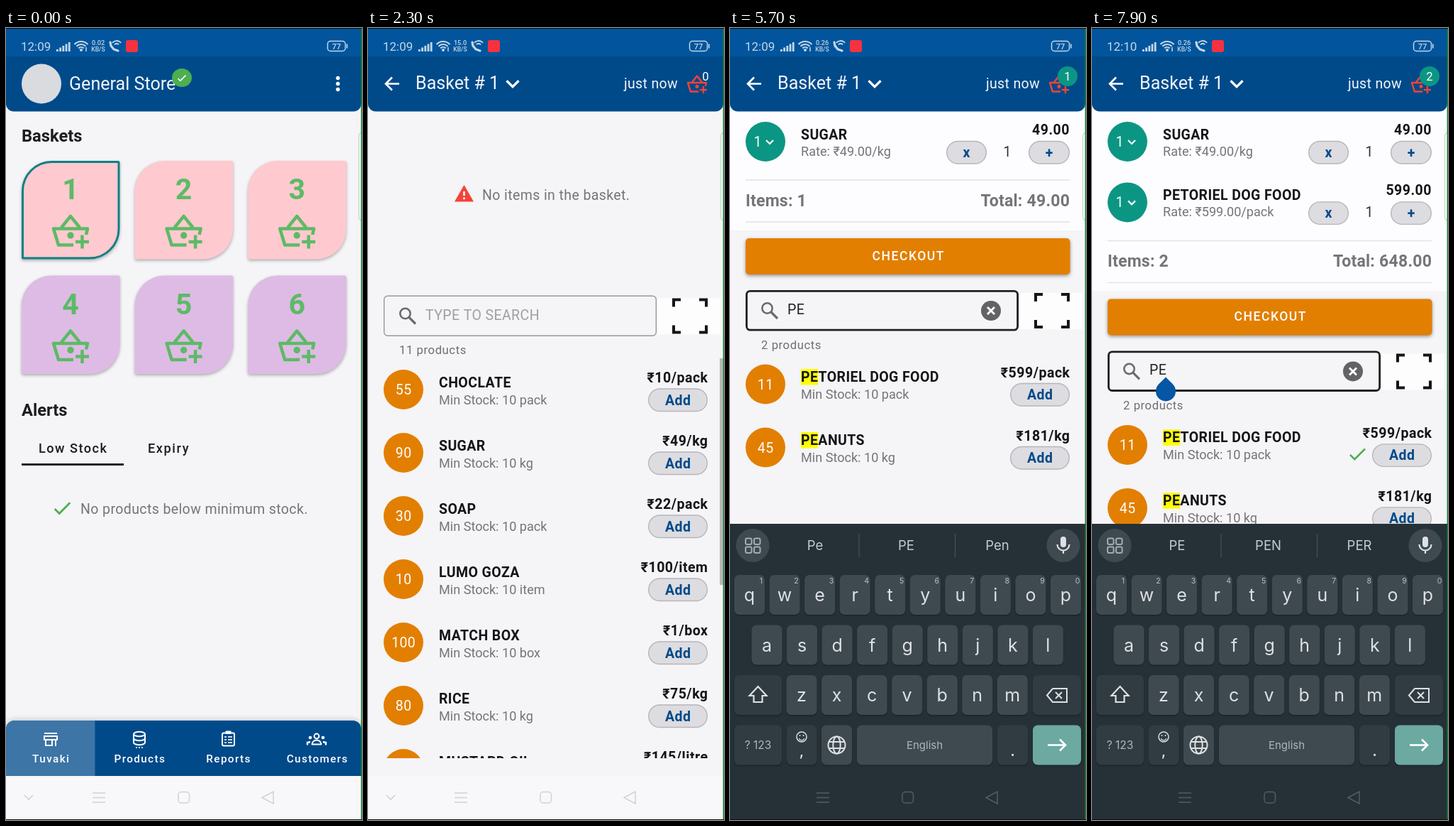
An HTML page with a canvas that plays this animation: 502 by 1115 pixels, repeating every 8 s.

```html
<!DOCTYPE html>
<html lang="en">
<head>
<meta charset="utf-8">
<title>Store basket</title>
<style>
html, body { margin: 0; width: 100%; height: 100%; overflow: hidden; background: #f5f4f7; }
canvas { display: block; width: 502px; height: 1115px; }
</style>
</head>
<body>
<canvas id="stage" width="502" height="1115"></canvas>
<script>
const W = 502, H = 1115, LOOP = 8000;
const screen2d = document.getElementById('stage').getContext('2d');
const layer = document.createElement('canvas');
layer.width = W; layer.height = H;
const layer2d = layer.getContext('2d');
let g = screen2d;

const BG = '#f5f4f7', BLUE = '#004a8a', ORANGE = '#e27f00', GREEN = '#4caf50', RED = '#f44336',
  TEAL = '#0b9683', GREY = '#757478', INK = '#151517', KB = '#263137', KEY = '#3f4a50', DARK = '#313c42';

const PRODUCTS = [
  ['CHOCLATE', 55, 10, 'pack'], ['SUGAR', 90, 49, 'kg'], ['SOAP', 30, 22, 'pack'],
  ['LUMO GOZA', 10, 100, 'item'], ['MATCH BOX', 100, 1, 'box'], ['RICE', 80, 75, 'kg'],
  ['MUSTARD OIL', 60, 145, 'litre'], ['PETORIEL DOG FOOD', 11, 599, 'pack'], ['PEANUTS', 45, 181, 'kg']
].map(([name, stock, rate, unit]) => ({ name, stock, rate, unit }));

const clamp = v => Math.max(0, Math.min(1, v));
const easeOut = u => 1 - (1 - u) ** 3;

// ---- drawing helpers
function text(s, x, y, size, color, { w = 400, ls = 0, al = 'left', f = 'Roboto' } = {}) {
  g.font = `${w} ${size}px ${f}, sans-serif`;
  g.letterSpacing = ls + 'px';
  g.textAlign = al;
  g.fillStyle = color;
  g.fillText(s, x + (al === 'right' ? ls : al === 'center' ? ls / 2 : 0), y);
}
function box(x, y, w, h, r, fill, stroke, lw = 1.4) {
  g.beginPath();
  g.roundRect(x, y, w, h, r);
  if (fill) { g.fillStyle = fill; g.fill(); }
  if (stroke) { g.strokeStyle = stroke; g.lineWidth = lw; g.stroke(); }
}
function disc(x, y, r, fill, stroke, lw = 2) {
  g.beginPath();
  g.arc(x, y, r, 0, 7);
  if (fill) { g.fillStyle = fill; g.fill(); }
  if (stroke) { g.strokeStyle = stroke; g.lineWidth = lw; g.stroke(); }
}
function arc(x, y, r, a, b, color, lw) {
  g.beginPath();
  g.arc(x, y, r, a * Math.PI, b * Math.PI);
  g.strokeStyle = color; g.lineWidth = lw; g.stroke();
}
function line(color, lw, ...p) {
  g.beginPath();
  for (let i = 0; i < p.length; i += 2) g.lineTo(p[i], p[i + 1]);
  g.strokeStyle = color; g.lineWidth = lw; g.stroke();
}
function shape(color, ...p) {
  g.beginPath();
  for (let i = 0; i < p.length; i += 2) g.lineTo(p[i], p[i + 1]);
  g.closePath(); g.fillStyle = color; g.fill();
}
function shadow(blur, dy, alpha) {
  g.shadowColor = `rgba(0,0,0,${alpha})`; g.shadowBlur = blur; g.shadowOffsetY = dy;
}
function clipped(x, y, w, h, r, draw) {
  g.save();
  g.beginPath(); g.roundRect(x, y, w, h, r); g.clip();
  draw();
  g.restore();
}
// A press ripple: grows while drifting to the middle, then fades.
function ripple(age, x0, y0, x1, y1, radius, rgb, hold = 250) {
  if (age < 0) return;
  const e = easeOut(clamp(age / 250));
  const a = 0.28 * clamp(age / 80) * (1 - clamp((age - hold) / 300));
  disc(x0 + (x1 - x0) * e, y0 + (y1 - y0) * e, radius * (0.3 + 0.7 * e), `rgba(${rgb},${a})`);
}
const check = (x, y, k, color, lw) => line(color, lw, x - 10 * k, y, x - 4 * k, y + 6 * k, x + 10 * k, y - 8 * k);
const chevron = (x, y, k, color, lw) => line(color, lw, x - k, y - k / 2, x, y + k / 2, x + k, y - k / 2);

function basket(x, y, k, c) {
  g.save();
  g.translate(x, y); g.scale(k, k);
  g.lineJoin = 'round';
  line(c, 4.5, -13, -6, 0, -22, 13, -6);
  line(c, 4.5, 4, 18.5, -17, 18.5, -24, -4.5, 24, -4.5, 22, 4);
  disc(0, 5, 4.7, c);
  line(c, 4.5, 7, 14, 26, 14);
  line(c, 4.5, 16.5, 4.5, 16.5, 23.5);
  g.restore();
}

// ---- system parts
function statusBar(t) {
  const c = '#c3d6e8';
  g.fillStyle = '#02559c'; g.fillRect(0, 0, W, 40);
  text(t < 6000 ? '12:09' : '12:10', 21, 32, 17, c);
  for (let i = 0; i < 5; i++) { g.fillStyle = c; g.fillRect(71 + i * 4.2, 30 - i * 2.5, 2.8, 3 + i * 2.5); }
  for (const r of [5, 9, 13]) arc(106, 32, r, -0.76, -0.24, c, 2.2);
  disc(106, 31, 2, c);
  line(c, 1.5, 113, 27, 113, 33);
  const speed = t < 400 ? '0.02' : t < 3200 ? '15.0' : t < 5600 ? '14.0' : '0.26';
  text(speed, 130, 24, 9.2, c, { w: 500, al: 'center' });
  text('KB/S', 130, 33, 8.6, c, { w: 500, al: 'center' });
  g.lineCap = 'round';
  line(c, 3.2, 147, 20, 148, 25, 152, 30, 158, 32);
  g.lineCap = 'butt';
  for (const r of [4, 8]) arc(156, 26, r, -0.78, -0.22, c, 1.8);
  box(169, 17, 17, 17, 3, '#f5323f');
  box(453.5, 18.5, 25, 14, 4, null, c, 1.5);
  g.fillStyle = c; g.fillRect(480, 22.5, 1.6, 6);
  text('77', 466, 29.5, 11, c, { w: 500, al: 'center' });
}
function navIcons(color, arrow) {
  if (arrow) chevron(32, 1083, 6, color, 1.6);
  for (const y of [1077, 1083.5, 1090]) line(color, 1.5, 122, y, 140, y);
  box(243, 1075.5, 15.5, 15.5, 4, null, color, 1.5);
  g.beginPath(); g.moveTo(361, 1083.5); g.lineTo(377, 1075); g.lineTo(377, 1092); g.closePath();
  g.lineWidth = 1.5; g.stroke();
}
function header() {
  box(0, 39, 501, 78.5, [0, 0, 11, 11], BLUE);
}

// ---- home page
function home(t) {
  header();
  disc(50, 78.5, 28, '#d9dbdf');
  text('General Store', 89, 87, 25.1, '#f2f6fa');
  g.beginPath(); g.ellipse(248, 70, 14, 13, 0, 0, 7); g.fillStyle = GREEN; g.fill();
  check(248, 71, 0.55, '#fff', 1.6);
  for (const y of [70.5, 78.5, 86.5]) disc(468, y, 2.7, '#fff');

  text('Baskets', 22, 159.5, 23.7, '#1d1c20', { w: 700 });
  for (let i = 0; i < 6; i++) {
    const x = 22 + (i % 3) * 159.6, y = 187 + (i > 2) * 161.5;
    const pressed = i === 0 && t >= 600, ink = pressed ? '#f0505a' : '#5dba66';
    g.save(); shadow(4, 2, 0.3);
    box(x, y, 138.5, 138.5, [42, 2, 42, 2], i < 3 ? '#ffc9d0' : '#debbe5');
    g.restore();
    text(i + 1, x + 69, y + 54, 41, ink, { w: 700, al: 'center' });
    basket(x + 69, y + 100, 1, ink);
    if (i) continue;
    clipped(x, y, 138.5, 138.5, [42, 2, 42, 2], () =>
      ripple(t - 600, x + 50, y + 60, x + 69, y + 69, 99, '0,0,0', 350));
    box(x + 1.5, y + 1.5, 135.5, 135.5, [41, 1, 41, 1], null, '#0a8182', 3);
  }

  text('Alerts', 22, 545.5, 23.7, '#1d1c20', { w: 700 });
  text('Low Stock', 46, 598, 18.1, '#1d1c20', { w: 500, ls: 1.5 });
  text('Expiry', 200, 598, 18.1, '#1d1c20', { w: 500, ls: 1.6 });
  g.fillStyle = '#212124'; g.fillRect(22, 613, 144, 3);
  check(79.5, 677, 1.08, GREEN, 2.8);
  text('No products below minimum stock.', 105, 684, 19.5, GREY, { ls: 0.4 });
  tabs();
}
function tabs() {
  g.save(); shadow(8, -1, 0.2);
  box(0, 975, 501, 78, [12, 12, 0, 0], BLUE);
  g.restore();
  box(0, 975, 125.5, 78, [12, 0, 0, 0], '#3c75a6');
  ['Tuvaki', 'Products', 'Reports', 'Customers'].forEach((s, i) =>
    text(s, 63 + i * 125.2, 1034, 15.3, '#fff', { w: 500, ls: 1.37, al: 'center' }));
  const c = '#fff';
  line(c, 2, 54, 993, 72, 993);
  box(54, 997, 18, 5, 0, null, c, 2);
  box(56, 1002, 9, 8, 0, null, c, 2);
  line(c, 2, 70, 1002, 70, 1011);
  for (const y of [994, 1000, 1006]) {
    g.beginPath(); g.ellipse(188, y, 8, 3.2, 0, y > 995 ? 0 : -Math.PI, Math.PI);
    g.lineWidth = 2; g.strokeStyle = c; g.stroke();
  }
  line(c, 2, 180, 994, 180, 1006); line(c, 2, 196, 994, 196, 1006);
  for (const x of [184, 188, 192]) disc(x, 1013, 1.1, c);
  box(305, 992.5, 17, 18, 2, null, c, 2);
  box(309.5, 989.5, 8, 4.5, 1, c);
  for (const y of [998, 1002, 1006]) { line(c, 1.6, 308, y, 311, y); line(c, 1.6, 313, y, 319, y); }
  disc(438, 997, 3.4, null, c, 2);
  arc(438, 1009, 6.5, 1, 2, c, 2); line(c, 2, 431, 1008.5, 445, 1008.5);
  for (const d of [-1, 1]) {
    disc(438 + d * 9, 999, 2.3, c);
    line(c, 2.4, 438 + d * 9, 1005, 438 + d * 13, 1006, 438 + d * 13, 1009.5);
  }
}

// ---- basket page
const NAME = { w: 700, ls: 0.4 }, PRICE = { w: 700, ls: 0.5, al: 'right' };

function pill(x, y, w, label) {
  box(x + 0.7, y, w - 1.4, 31.5, 16, '#dddce0', '#b6b5b9');
  text(label, x + w / 2, y + 22.5, 19.5, BLUE, { w: 700, al: 'center', ls: 0.35 });
}
function cartLine(p, y) {
  disc(50, y, 28, TEAL);
  text('1', 39, y + 7, 19.5, '#fff', { al: 'center' });
  chevron(56, y + 0.5, 5, '#fff', 2.2);
  text(p.name, 100, y - 3.5, 19.5, INK, NAME);
  text(`Rate: ₹${p.rate}.00/${p.unit}`, 100, y + 20, 18.1, GREY);
  text(p.rate + '.00', 478.5, y - 10, 19.5, INK, PRICE);
  pill(305, y - 0.5, 57, 'x');
  text('1', 391, y + 20.5, 19.5, '#333', { al: 'center' });
  pill(421, y - 0.5, 58, '+');
}
function cart(items, sy) {
  g.fillStyle = '#fdfcfe'; g.fillRect(0, 106, W, sy - 84 - 106);
  items.forEach((p, i) => cartLine(p, 160 + i * 85.4));
  for (const y of [sy - 155, sy - 96]) line('#e2e1e4', 1.5, 22, y, 479, y);
  const total = items.reduce((sum, p) => sum + p.rate, 0);
  text('Items: ' + items.length, 22, sy - 118, 23.1, GREY, { w: 700, ls: 0.2 });
  text(`Total: ${total}.00`, 479, sy - 118, 23.1, GREY, { w: 700, ls: 0.2, al: 'right' });
  g.save(); shadow(5, 2, 0.4);
  box(22, sy - 73, 457.5, 51, 5, ORANGE);
  g.restore();
  text('CHECKOUT', 251, sy - 42, 17.5, '#fff', { w: 500, ls: 1.55, al: 'center' });
}
function search(sy, q, focus, cursor) {
  const lw = focus ? 2.8 : 1.4;
  g.fillStyle = '#fdfdfe'; g.fillRect(408, sy + 4, 89, 51);
  box(22 + lw / 2, sy + lw / 2, 385 - lw, 57.5 - lw, 5, BG, focus ? '#212124' : '#98979b', lw);
  disc(52.5, sy + 25.5, 7.2, null, '#6b6a6e', 2.6);
  line('#6b6a6e', 3.2, 57.5, sy + 30.5, 67, sy + 40);
  if (q) text(q, 81, sy + 34, 19.5, '#222', { ls: 0.35 });
  else text('TYPE TO SEARCH', 81, sy + 34, 19.5, '#9f9ea2', { ls: 0.4 });
  if (cursor) { g.fillStyle = '#222'; g.fillRect(q.length ? 81 + q.length * 12 : 80.5, sy + 15, 1.6, 24); }
  if (q && focus) {
    disc(368, sy + 29, 14, '#636266');
    line('#fff', 2.8, 363, sy + 24, 373, sy + 34);
    line('#fff', 2.8, 373, sy + 24, 363, sy + 34);
  }
  // scan frame corners
  const cx = 454, cy = sy + 29;
  for (const a of [-1, 1]) for (const b of [-1, 1])
    line(INK, 4, cx + a * 13, cy + b * 23, cx + a * 23, cy + b * 23, cx + a * 23, cy + b * 13);
}
function productRow(p, cy, q, inCart, press) {
  disc(50, cy, 28, ORANGE);
  text(p.stock, 50, cy + 7, 19.5, '#fff', { al: 'center', ls: 0.35 });
  const at = q ? p.name.indexOf(q) : -1;
  if (at >= 0) {
    g.font = `${NAME.w} 19.5px Roboto, sans-serif`; g.letterSpacing = NAME.ls + 'px';
    const x = 100 + g.measureText(p.name.slice(0, at)).width;
    g.fillStyle = '#ff0'; g.fillRect(x, cy - 21.5, g.measureText(q).width, 22.5);
  }
  text(p.name, 100, cy - 3.5, 19.5, INK, NAME);
  text(`Min Stock: 10 ${p.unit}`, 100, cy + 20.5, 18.1, GREY);
  text(`₹${p.rate}/${p.unit}`, 479, cy - 10, 19.5, INK, PRICE);
  if (inCart) check(374.5, cy + 14, 1.05, GREEN, 2.6);
  pill(395, cy - 1, 84, 'Add');
  if (press < 0 || press > 600) return;
  clipped(395, cy - 1, 84, 32, 16, () => ripple(press, 422, cy + 15, 435, cy + 15, 42, '0,100,170'));
  clipped(0, cy - 44.5, 500, 89, 0, () => ripple(press, 437, cy + 14, 251, cy, 248, '0,0,0'));
}
function basketPage(t) {
  const items = [t >= 3200 && PRODUCTS[1], t >= 6900 && PRODUCTS[7]].filter(Boolean);
  const n = items.length, sy = n ? 283.6 + 85.4 * n : 376.5;
  const q = t < 4800 ? '' : t < 5200 ? 'P' : 'PE';
  const focus = t >= 3500 && t < 6500 || t >= 7400;
  const cursor = focus && (t < 4400 || t >= 4800 && t < 5700 || t >= 6200 && t < 7900);

  if (n) cart(items, sy);
  else {
    shape(RED, 135.5, 221, 149, 244.5, 122, 244.5);
    g.fillStyle = '#fff'; g.fillRect(134.2, 230, 2.6, 6); g.fillRect(134.2, 238.5, 2.6, 2.6);
    text('No items in the basket.', 161, 242, 19.5, GREY, { ls: 0.4 });
  }
  const list = PRODUCTS.filter(p => p.name.includes(q));
  clipped(0, sy + 80, W, (n === 1 ? 1020 : 1028) - sy - 80, 0, () => list.forEach((p, i) => {
    const press = p.name === 'SUGAR' ? t - 2800 : p === PRODUCTS[7] ? t - 6585 : -1;
    productRow(p, sy + 132.5 + i * 89, q, items.includes(p), press);
  }));
  if (!q) { g.fillStyle = '#b9b8bb'; g.fillRect(496, sy + 88.5, 5, 319); }
  text(`${q ? list.length : 11} products`, 44, sy + 82.5, 16.7, '#6f6e73', { ls: 0.56 });
  search(sy, q, focus, cursor);
  if (t >= 7400) {
    disc(104, sy + 57, 14, '#0556a4');
    shape('#0556a4', 104, sy + 37.2, 114, sy + 47.2, 94, sy + 47.2);
  }

  header();
  line('#fff', 2.6, 44, 78.5, 25, 78.5);
  line('#fff', 2.6, 34, 69.5, 25, 78.5, 34, 87.5);
  text('Basket # 1', 67, 85.5, 25.1, '#f2f6fa');
  chevron(204, 78.5, 8.5, '#fff', 3.2);
  text('just now', 361, 85, 19.5, '#f2f6fa', { ls: 0.35 });
  basket(464, 79.5, 0.54, RED);
  if (n) disc(476, 68, 14, TEAL);
  text(n, 476, 73.5, 16.7, '#fff', { al: 'center' });
}

// ---- keyboard
const FONT = { f: 'Inter', al: 'center' };
const LIGHT = '#dde1e3', SOFT = '#a3abaf';

function key(x, y, w, color) {
  g.save(); shadow(2, 1.5, 0.3);
  box(x, y, w, 56, 7, color);
  g.restore();
}
function toolbar(words) {
  disc(32, 728.5, 23.5, KEY);
  for (const x of [22, 34]) for (const y of [718.5, 730.5]) box(x, y, 8.5, 8.5, 2, null, SOFT, 2);
  disc(470, 728.5, 23.5, KEY);
  box(466, 716, 8, 15, 4, LIGHT);
  arc(470, 727, 8.5, 0, 1, LIGHT, 2.2);
  line(LIGHT, 2.2, 470, 735, 470, 740);
  if (words) {
    words.forEach((s, i) => text(s, 120 + i * 128.5, 735, 18.5, '#c6ccd0', FONT));
    for (const x of [182, 317.5]) line('#465157', 1.2, x, 712, x, 745);
    return;
  }
  box(109, 717.5, 22, 22, 4, null, SOFT, 2.4);
  arc(120, 728, 6, 0.1, 0.9, SOFT, 2.2);
  disc(116, 725, 1.6, SOFT); disc(124, 725, 1.6, SOFT);
  text('GIF', 206.5, 735, 17.5, SOFT, { ...FONT, w: 700, ls: 0.6 });
  for (let i = 0; i < 3; i++) {
    const a = i * Math.PI / 3 + Math.PI / 6, c = 11.5 * Math.cos(a), s = 11.5 * Math.sin(a);
    line(SOFT, 6, 293 - c, 728.5 - s, 293 + c, 728.5 + s);
  }
  disc(293, 728.5, 9, SOFT); disc(293, 728.5, 3.8, KB);
  disc(380, 728.5, 11.5, SOFT); disc(388, 736, 5, KB); disc(385, 732, 3.5, SOFT);
  for (const [x, y] of [[373.5, 729], [377, 723], [383.5, 723], [387, 729]]) disc(x, y, 1.9, KB);
}
function keyboard(t) {
  const caps = t < 4800;
  const words = t < 4800 ? null : t < 5200 ? ['P', 'Pe', 'Please'] : t < 7000 ? ['Pe', 'PE', 'Pen']
    : t < 7800 ? null : ['PE', 'PEN', 'PER'];
  g.fillStyle = KB; g.fillRect(0, 698, W, H - 698);
  toolbar(words);
  [['qwertyuiop', 27.5, 770], ['asdfghjkl', 52, 840.5], ['zxcvbnm', 101, 911]].forEach(([row, x0, y], r) =>
    [...row].forEach((ch, i) => {
      const x = x0 + i * 49.55;
      key(x - 21.5, y, 43, KEY);
      text(caps ? ch.toUpperCase() : ch, x, y + 37, 25, LIGHT, FONT);
      if (!r) text((i + 1) % 10, x + 16.5, y + 11.5, 10.5, '#b9c0c3', FONT);
    }));

  key(6, 911, 67, DARK);
  g.beginPath();
  for (const [x, y] of [[0, -12], [12, 1], [6, 1], [6, 10], [-6, 10], [-6, 1], [-12, 1]]) g.lineTo(39.5 + x, 939 + y);
  g.closePath();
  if (caps) { g.fillStyle = SOFT; g.fill(); }
  else { g.strokeStyle = LIGHT; g.lineWidth = 2.2; g.stroke(); }
  key(427, 911, 68, DARK);
  line(LIGHT, 2, 455, 930, 475, 930, 475, 949, 455, 949, 447, 939.5, 455, 930);
  line(LIGHT, 2, 459, 935, 468, 944); line(LIGHT, 2, 468, 935, 459, 944);

  const y = 981.5;
  key(6, y, 67, DARK);
  text('? 123', 39.5, 1015, 15.5, '#aeb6ba', FONT);
  key(80, y, 42.5, DARK);
  disc(101, 998, 7, null, LIGHT, 1.5);
  arc(101, 999, 3.8, 0.1, 0.9, LIGHT, 1.4);
  disc(98.5, 996, 1, LIGHT); disc(103.5, 996, 1, LIGHT);
  text(',', 101, 1025, 19, LIGHT, { ...FONT, w: 600 });
  key(129, y, 43, KEY);
  disc(150.5, 1009.5, 12, null, LIGHT, 2);
  g.beginPath(); g.ellipse(150.5, 1009.5, 5.2, 12, 0, 0, 7); g.stroke();
  for (const d of [-4.5, 4.5]) line(LIGHT, 2, 140, 1009.5 + d, 161, 1009.5 + d);
  key(179, y, 191, KEY);
  text('English', 274.5, 1015, 15, '#aeb6ba', FONT);
  key(377, y, 43, DARK);
  text('.', 398.5, 1025, 21, LIGHT, { ...FONT, w: 600 });
  key(427, y, 68, '#6ba9a1');
  line('#fff', 2.6, 448, 1009.5, 473, 1009.5);
  line('#fff', 2.6, 465, 1001.5, 473, 1009.5, 465, 1017.5);
}
function preview(ch, x, dot) {
  g.save(); shadow(5, 1, 0.35);
  box(x - 26, 671, 52, 155, 6, KEY);
  g.restore();
  text(ch, x - 1, 719, 29, '#f0f2f3', FONT);
  for (const d of [0, 4, 8]) disc(x + 12 + d, 742, 1.3, LIGHT);
  disc(dot, 812, 15.5, 'rgba(120,126,130,.8)');
  disc(dot, 812, 13.5, '#c6c7ca');
}
function keyboardLevel(t) {
  if (t < 6600) return easeOut(clamp((t - 3850) / 250));
  if (t < 7200) return 1 - clamp((t - 6600) / 370);
  return easeOut(clamp((t - 7550) / 250));
}

function draw(t) {
  g = screen2d;
  g.fillStyle = BG; g.fillRect(0, 0, W, H);
  if (t < 1100) home(t); else basketPage(t);
  statusBar(t);
  box(497.5, 147, 12, 124, 5, null, '#bcdcc3', 1.2);
  g.fillStyle = '#f8f7f9'; g.fillRect(0, 1053, W, 62);

  const k = keyboardLevel(t);
  if (k > 0) {
    g = layer2d;
    g.clearRect(0, 0, W, H);
    keyboard(t);
    g = screen2d;
    g.globalAlpha = k;
    g.drawImage(layer, 0, 698, W, H - 698, 0, Math.round(698 + (1 - k) * 83), W, H - 698);
    g.globalAlpha = 1;
  }
  navIcons(k === 1 ? '#545d62' : k > 0 ? '#49535a' : '#d2d1d5', t < 3700 || t >= 6970 && t < 7500);
  if (t >= 4600 && t < 4800) preview('P', 473, 470);
  if (t >= 5000 && t < 5200) preview('e', 127, 127);

  g.fillStyle = '#1f7f33'; g.fillRect(500.6, 0, 1.4, H);
  g.fillStyle = '#0b0b0c'; g.fillRect(0, 0, W, 1); g.fillRect(0, 1114, W, 1);
}

const start = performance.now();
function tick() {
  draw((performance.now() - start) % LOOP);
  requestAnimationFrame(tick);
}
tick();
</script>
</body>
</html>
```
